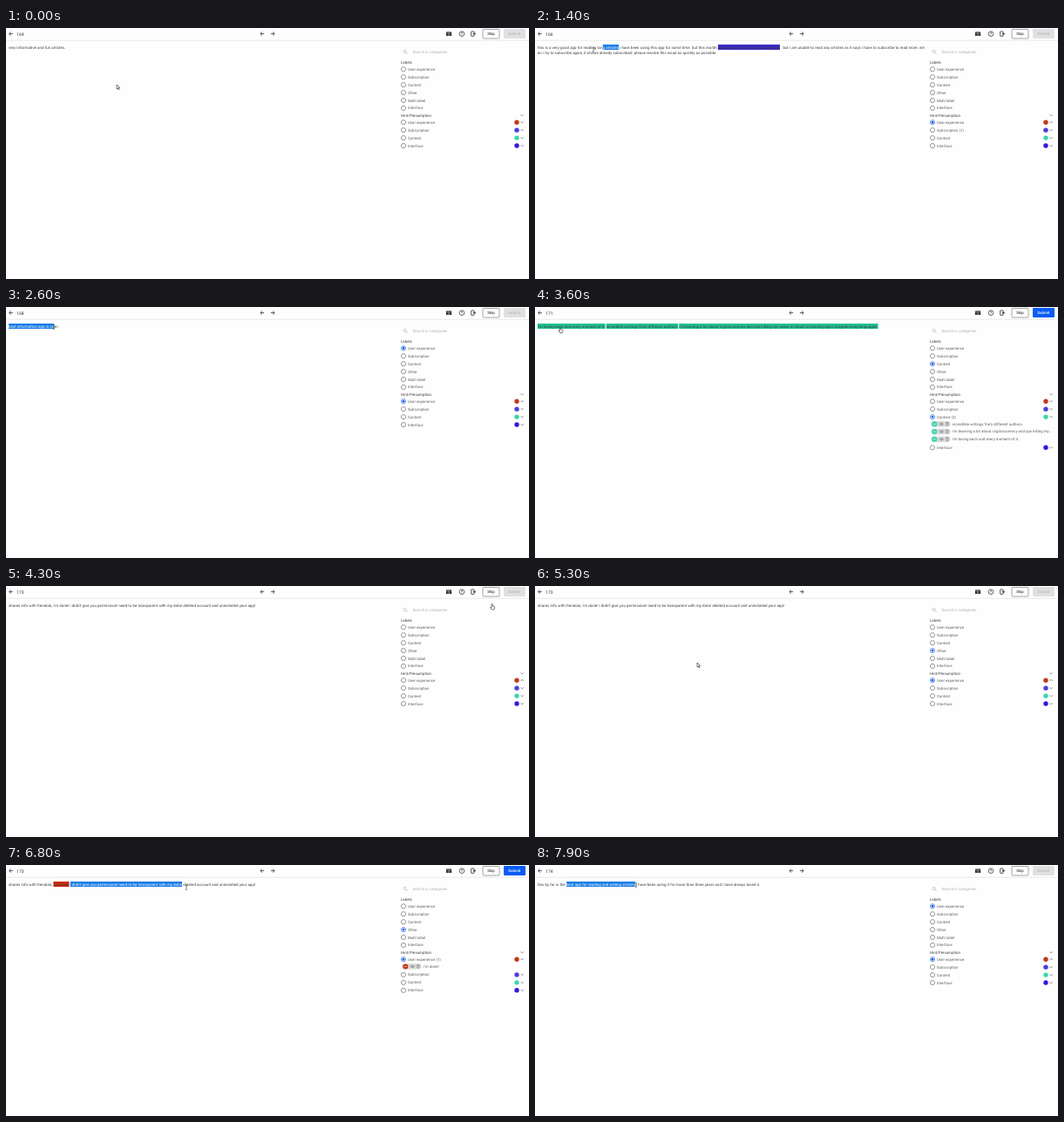
These frames come from a looping animation (600x288 px, 8000 ms). An HTML page with a canvas:

```html
<!DOCTYPE html>
<html lang="en">
<head>
<meta charset="utf-8">
<title>Text labelling</title>
<style>
  html, body { margin: 0; width: 100%; height: 100%; overflow: hidden; background: #fefefe; }
  canvas { display: block; width: 600px; height: 288px; }
</style>
</head>
<body>
<canvas id="stage" width="600" height="288"></canvas>
<script>
const ctx = document.getElementById('stage').getContext('2d');
const LOOP = 8000, STEP = 100;
const K = 0.3125;               // interface pixels to stage pixels
const INK = '#333', BLUE = '#1d5fe6';
const LABELS = ['User experience', 'Subscription', 'Content', 'Other', 'Multi label', 'Interface'];
const HINTS = [
  { name: 'User experience', dot: '#c13a1c', mark: '#cc2c10' },
  { name: 'Subscription', dot: '#4b3fdf', mark: '#3a29c6' },
  { name: 'Content', dot: '#35d8ae', mark: '#22c095' },
  { name: 'Interface', dot: '#3418dc', mark: '#3418dc' }
];

const PAID = 'i have paid for monthly subscription';
const LONG = 'good app for reading long articles';
const SEEN = 'best information app in seen';
const LOVING = "i'm loving each and every moment of it.";
const WRITINGS = 'incredible writings from different authors.';
const LEARNING = "i'm learning a lot about cryptocurrency and ups killing my career in cloud computing apps, programming languages.";
const DONE = "i'm done!";
const PERMISSION = "i didn't give you permission! need to be transparent with my data!";
const BEST = 'best app for reading and writing articles';

const fresh = { label: -1, hint: -1, open: 0, marks: {}, sel: '', submit: false, hover: false };

// Each entry changes the state from its time on.
const SCRIPT = [
  [0, { ...fresh, id: 164, open: 1, lines: ['very informative and fun articles.'] }],
  [500, { ...fresh, id: 166, open: 1, lines: [
    `this is a very ${LONG} i have been using this app for some time. but this month ${PAID} . but i am unable to read any articles as it says i have to subscribe to read more. wh`,
    'en i try to subscribe again, it shows already subscribed. please resolve this issue as quickly as possible.'] }],
  [800, { hint: 1 }],
  [1000, { sel: 'i have paid for' }],
  [1100, { sel: PAID }],
  [1200, { sel: '', marks: { 1: [PAID] } }],
  [1300, { hint: 0, open: 0 }],
  [1400, { sel: 'g articles' }],
  [1500, { sel: LONG }],
  [1600, { sel: '', marks: { 0: [LONG], 1: [PAID] } }],
  [2000, { label: 4, submit: true }],
  [2200, { hover: true }],
  [2300, { ...fresh, id: 168, lines: [SEEN] }],
  [2400, { label: 0 }],
  [2500, { hint: 0 }],
  [2600, { sel: 'best information app in se' }],
  [2700, { sel: '', marks: { 0: [SEEN] }, submit: true }],
  [2800, { hover: true }],
  [2900, { ...fresh, id: 171, lines: [`${LOVING} ${WRITINGS} ${LEARNING}`] }],
  [3000, { label: 2, hint: 2, open: 2 }],
  [3100, { sel: WRITINGS }],
  [3200, { sel: '', marks: { 2: [WRITINGS] }, submit: true }],
  [3300, { sel: LEARNING }],
  [3400, { sel: '', marks: { 2: [WRITINGS, LEARNING] } }],
  [3500, { sel: LOVING }],
  [3600, { sel: '', marks: { 2: [WRITINGS, LEARNING, LOVING] } }],
  [4000, { hover: true }],
  [4200, { ...fresh, id: 173, lines: [`shares info with frendolo, ${DONE} ${PERMISSION} deleted account and uninstalled your app!`] }],
  [4700, { label: 3 }],
  [5000, { hint: 0 }],
  [5900, { sel: "i'm" }],
  [6000, { sel: DONE }],
  [6100, { sel: '', marks: { 0: [DONE] }, submit: true }],
  [6600, { sel: "i didn't give" }],
  [6700, { sel: "i didn't give you permission! need" }],
  [6800, { sel: PERMISSION }],
  [6900, { sel: '', marks: { 0: [DONE, PERMISSION] } }],
  [7300, { hover: true }],
  [7500, { ...fresh, id: 174, lines: [`this by far is the ${BEST} i have been using it for more than three years and i have always loved it.`] }],
  [7600, { label: 0 }],
  [7700, { hint: 0 }],
  [7800, { sel: 'best app for reading' }],
  [7900, { sel: BEST }]
];

// Pointer: time, x, y, shape
const PATH = [
  [0, 127, 65, 'arrow'], [400, 306, 7, 'hand'], [500, 306, 7, 'hand'], [800, 456, 117, 'hand'],
  [900, 210, 23, 'beam'], [1100, 280, 23, 'beam'], [1200, 330, 60, 'arrow'], [1300, 456, 108, 'hand'],
  [1400, 67, 25, 'beam'], [1500, 41, 23, 'beam'], [1700, 300, 70, 'arrow'], [2000, 456, 83, 'hand'],
  [2200, 583, 7, 'hand'], [2300, 583, 7, 'hand'], [2400, 456, 47, 'hand'], [2500, 456, 108, 'hand'],
  [2600, 55, 23, 'beam'], [2700, 60, 23, 'beam'], [2800, 583, 7, 'hand'], [2900, 583, 7, 'hand'],
  [3000, 456, 126, 'hand'], [3100, 165, 23, 'beam'], [3300, 394, 23, 'beam'], [3500, 81, 23, 'beam'],
  [3600, 29, 23, 'hand'], [4000, 583, 7, 'hand'], [4200, 583, 7, 'hand'], [4700, 456, 74, 'hand'],
  [5000, 456, 108, 'hand'], [5300, 186, 88, 'arrow'], [5800, 56, 23, 'beam'], [6000, 75, 23, 'beam'],
  [6300, 77, 25, 'beam'], [6500, 77, 25, 'beam'], [6800, 207, 26, 'beam'], [7000, 300, 80, 'arrow'],
  [7300, 583, 7, 'hand'], [7500, 583, 7, 'hand'], [7600, 456, 47, 'hand'], [7700, 456, 108, 'hand'],
  [7800, 75, 23, 'beam'], [7900, 116, 23, 'beam']
];

function setFont(size = 14, weight = 400, gap = 0.03) {
  ctx.font = `${weight} ${size}px Roboto, Arial, sans-serif`;
  ctx.letterSpacing = gap + 'px';
  ctx.textRendering = 'geometricPrecision';
}

function write(str, x, y, color, align = 'left') {
  ctx.save();
  ctx.translate(x, y);
  ctx.scale(K, K);
  ctx.fillStyle = color;
  ctx.textAlign = align;
  ctx.fillText(str, 0, 0);
  ctx.restore();
}

const widthOf = str => ctx.measureText(str).width * K;

function line(color, width, ...pts) {
  ctx.beginPath();
  for (let i = 0; i < pts.length; i += 2) ctx.lineTo(pts[i], pts[i + 1]);
  ctx.strokeStyle = color;
  ctx.lineWidth = width;
  ctx.stroke();
}

function paint(color, stroke) {
  ctx.fillStyle = ctx.strokeStyle = color;
  ctx.lineWidth = stroke;
  stroke ? ctx.stroke() : ctx.fill();
}

function disc(x, y, r, color, stroke = 0) {
  ctx.beginPath();
  ctx.arc(x, y, r, 0, Math.PI * 2);
  paint(color, stroke);
}

function box(x, y, w, h, r, color, stroke = 0) {
  ctx.beginPath();
  ctx.roundRect(x, y, w, h, r);
  paint(color, stroke);
}

function arrow(x, y, dir) {
  line(INK, 0.8, x - 2.1 * dir, y, x + 2.1 * dir, y);
  line(INK, 0.8, x, y - 2, x + 2.1 * dir, y, x, y + 2);
}

function chevron(x, y, up) {
  const d = up ? -0.8 : 0.8;
  line('#555', 0.65, x - 1.6, y - d, x, y + d, x + 1.6, y - d);
}

function radio(y, on) {
  disc(456, y, 2.6, on ? BLUE : '#666', 0.65);
  if (on) disc(456, y, 1.45, BLUE);
}

function header(s) {
  line('#e4e4e4', 0.8, 0, 14.2, 600, 14.2);
  arrow(5.8, 6.6, -1);
  setFont(16, 400, 0.3);
  write(s.id, 12, 8.5, INK);
  arrow(294, 6.6, -1);
  arrow(306, 6.6, 1);

  box(505, 4.4, 6.2, 4.6, 0.6, '#222');
  ctx.fillStyle = '#fff';
  for (let i = 0; i < 8; i++) ctx.fillRect(505.8 + i % 4 * 1.3, 5.2 + (i >> 2) * 1.2, 0.6, 0.6);
  ctx.fillRect(506.6, 7.7, 3, 0.6);

  disc(523, 6.7, 2.8, '#222', 0.7);
  setFont(13, 700);
  write('?', 523, 8.2, '#222', 'center');

  box(533.7, 4, 3.3, 5.4, 0.4, '#222', 0.75);
  line('#222', 0.8, 536, 6.7, 538.4, 6.7);
  line('#222', 0.7, 537.5, 5.5, 538.7, 6.7, 537.5, 7.9);

  setFont(14, 500);
  box(547, 1.5, 19, 10.5, 1, '#777', 0.65);
  write('Skip', 556.5, 8.3, '#444', 'center');
  box(571, 1, 25, 11, 1, !s.submit ? '#e0e0e0' : s.hover ? '#0050d8' : '#0a5cf5');
  write('Submit', 583.3, 8.3, s.submit ? '#fff' : '#b8b8b8', 'center');
}

function body(s) {
  setFont(14, 400, 0.15);
  const span = (str, part) => {
    const i = part ? str.indexOf(part) : -1;
    return i < 0 ? null : [3 + widthOf(str.slice(0, i)), widthOf(part)];
  };
  s.lines.forEach((str, row) => {
    const top = 19 + row * 6.25, base = top + 4.5;
    for (const h in s.marks) {
      for (const part of s.marks[h]) {
        const m = span(str, part);
        if (!m) continue;
        ctx.fillStyle = HINTS[h].mark;
        ctx.fillRect(m[0], top, m[1], 6);
      }
    }
    write(str, 3, base, '#3c3c3c');
    const sel = span(str, s.sel);
    if (!sel) return;
    ctx.save();
    ctx.beginPath();
    ctx.rect(sel[0], top, sel[1], 6);
    ctx.clip();
    ctx.fillStyle = '#1a7ee6';
    ctx.fillRect(sel[0], top, sel[1], 6);
    write(str, 3, base, '#fff');
    ctx.restore();
  });
}

function item(str, y, color) {
  box(454.3, y - 3.2, 22.2, 6.4, 3.2, '#d9d9d9');
  disc(458.3, y, 3, color);
  line('#ffffffb0', 0.8, 456.8, y, 459.8, y);
  ctx.beginPath();
  ctx.ellipse(466.3, y, 2.1, 1.2, 0, 0, Math.PI * 2);
  paint('#777', 0.6);
  disc(466.3, y, 0.7, '#777');
  box(471.8, y - 1.1, 2.2, 2.8, 0.3, '#777', 0.6);
  line('#777', 0.6, 471.2, y - 1.8, 474.6, y - 1.8);
  let cut = str;
  while (widthOf(cut) > 114) cut = cut.slice(0, cut.lastIndexOf(' '));
  write(cut === str ? str : cut + '...', 479, y + 1.4, '#5c5c5c');
}

function sidebar(s) {
  disc(457.6, 26.9, 1.6, '#aaa', 0.6);
  line('#aaa', 0.7, 458.8, 28.1, 460.6, 29.9);
  setFont();
  write('Search in categories', 466.6, 29, '#b0b0b0');
  write('Labels', 453, 40.8, '#3c3c3c');
  LABELS.forEach((name, i) => {
    const y = 47.3 + i * 8.93;
    radio(y, s.label === i);
    write(name, 461, y + 1.5, '#5f5f5f');
  });
  write('Hint/Presumption', 453, 101.6, '#3c3c3c');
  chevron(592.2, 100.2, false);
  let y = 108.2;
  HINTS.forEach((h, i) => {
    const items = s.marks[i] || [], open = s.open === i;
    radio(y, s.hint === i);
    write(h.name + (items.length ? ` (${items.length})` : ''), 461, y + 1.5, '#5f5f5f');
    disc(586, y, 2.7, h.dot);
    chevron(592.2, y, open);
    if (open) {
      items.forEach((str, n) => item(str, y + 8.2 + n * 8.7, h.dot));
      y += items.length * 8.75;
    }
    y += 8.95;
  });
}

function outline(d) {
  const p = new Path2D(d);
  ctx.fillStyle = '#fff';
  ctx.fill(p);
  ctx.strokeStyle = '#222';
  ctx.lineWidth = 0.6;
  ctx.stroke(p);
}

function pointer(t) {
  let i = PATH.length - 1;
  while (PATH[i][0] > t) i--;
  const a = PATH[i], b = PATH[i + 1] || a;
  const u = b === a ? 0 : (t - a[0]) / (b[0] - a[0]);
  ctx.save();
  ctx.translate(a[1] + (b[1] - a[1]) * u, a[2] + (b[2] - a[2]) * u);
  if (a[3] === 'beam') {
    line('#333', 0.6, 0, -2.4, 0, 2.4);
    line('#333', 0.5, -0.9, -2.4, 0.9, -2.4);
    line('#333', 0.5, -0.9, 2.4, 0.9, 2.4);
  } else if (a[3] === 'hand') {
    outline('M-.5 .4 Q0 -.3 .6 .4 V2.6 L2.8 3.1 Q3.3 3.4 3 4.6 L2.4 6.6 H-.5 L-2 4.2 L-1.5 3.6 L-.5 4.3 Z');
  } else {
    outline('M0 0 V5 L1.2 4 L2 5.8 L2.8 5.4 L2 3.7 H3.6 Z');
  }
  ctx.restore();
}

function draw(t) {
  const s = {};
  for (const [at, patch] of SCRIPT) if (at <= t) Object.assign(s, patch);
  ctx.fillStyle = '#fefefe';
  ctx.fillRect(0, 0, 600, 288);
  header(s);
  body(s);
  sidebar(s);
  pointer(t);
}

const start = performance.now();
function tick() {
  const t = (performance.now() - start) % LOOP;
  draw(Math.floor(t / STEP) * STEP);
  requestAnimationFrame(tick);
}
tick();
</script>
</body>
</html>
```
